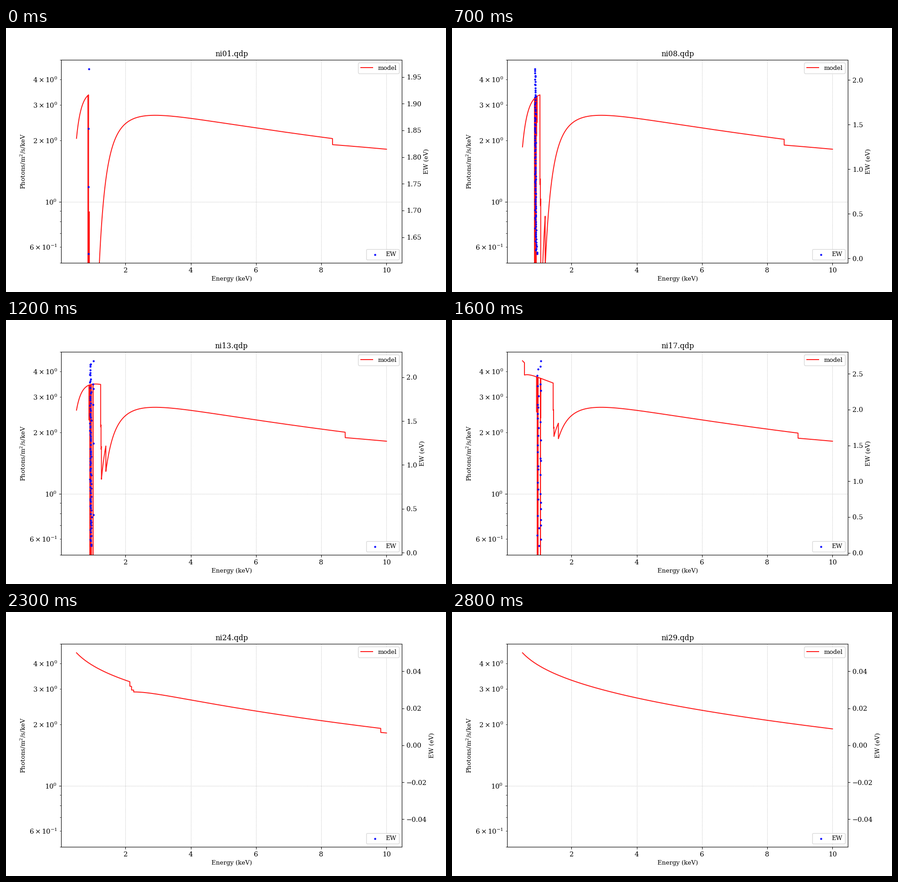
A matplotlib script for the animation above (2.9 s loop, 966 by 580 pixels).

```python
import numpy as np
import matplotlib.pyplot as plt
from matplotlib.animation import FuncAnimation

plt.rcParams.update({"font.family": "DejaVu Serif",
                     "mathtext.fontset": "dejavuserif"})

STAGES = 29
ENERGY = np.arange(0.5, 10.0002, 0.0005)


def base(x):
    """Log of the unabsorbed continuum."""
    return 1.476 - 0.15 * np.log(x) - 0.114 * x ** 0.63


def tail(x):
    """Optical depth of a full middle shell above its edges."""
    return 1.6 * x ** -2.5 + 3.6 * x ** -7


def rydberg(n):
    """Line energies of the one- and two-electron stages."""
    k = np.array([2, 3])
    return (10.29 + 0.49 * (n - 27)) * (1 - 1 / k ** 2)


def cluster(m):
    """Start of the main line group and place of the side group."""
    return 0.852 + 0.0004 * m ** 2, 0.88 + 0.0106 * m


def line_list(n):
    """Absorption lines as (energy, optical depth)."""
    if n in (27, 28):
        return [(e, 15) for e in rydberg(n)]
    if n > 18:
        return []
    start, side = cluster(n - 1)
    count = min(n + 1, 5, 20 - n)
    end = start + 0.011 * (count - 1)
    lines = [(e, 15) for e in np.linspace(start, end, count)]
    if 6 <= n <= 10:
        lines += [(end + 0.012, 0.45), (end + 0.027, 0.3)]
    if n > 10:
        lines += [(side, 15), (start - 0.022, 0.4)]
    if n > 14:
        lines.append((side + 0.011, 0.45))
    return lines


def spectrum(n):
    x = ENERGY
    m = n - 1                    # electrons removed
    late = max(m - 18, 0)        # of these from the middle shell
    shift = 0.0089 * min(m, 18) ** 1.5 + 0.117 * late
    edge = 0.87 + shift
    last_edge = edge + 0.16 - 0.006 * max(m - 16, 0)
    inner_edge = 8.345 + 1.05 * shift + 0.03 * late

    # outer shell
    left = max(18 - m, 0)
    amount = 0.93 * np.sin(np.pi * left / 27) ** 1.15
    outer = (x >= 0.5 + 0.06 * (n - 16)) & (x < edge)
    tau = outer * amount * (2 * x) ** -(2.65 - 0.003 * m ** 2)

    # middle shell, opening in steps
    gap = 0.012 + 0.008 * late
    low, mid = 0.2 + 0.01 * m, 0.15 + 0.028 * m
    share = np.select([x < edge, x >= last_edge, x < edge + gap, x < edge + 2 * gap],
                      [0, 1, low, mid], max(0.72, mid))
    tau += np.clip((27 - n) / 8, 0, 1) ** 0.8 * share * tail(x)

    # inner shell
    tau += (x >= inner_edge) * 0.069 * (x / 8.345) ** -2.5

    for e, depth in line_list(n):
        tau += depth * np.exp(-((x - e) / 0.0012) ** 2)
    return np.exp(base(x) - tau)


def widths(n):
    """Scatter points as (energy, equivalent width)."""
    if n in (27, 28):
        e = rydberg(n)
        return np.column_stack([e, [5.5, 2.5]])
    if n > 18:
        return np.empty((0, 2))
    m = n - 1
    rng = np.random.default_rng(40 + n)
    start, side = cluster(m)
    crowd = np.sin(np.pi * m / 18)
    count = int(4 + 95 * crowd)

    # heights from 0 to 1, gathered near the bottom in the early stages
    bend = 1 + 2.5 * np.exp(-((m - 3) / 2) ** 2)
    u = np.linspace(0, 1, count)
    u[1:-1] += rng.uniform(-0.5, 0.5, count - 2) / count
    h = u ** bend

    spread = 0.005 + 0.0005 * m
    e = start + 0.018 + spread * np.clip(rng.normal(size=count), -1.8, 1.8)
    e += 0.06 * rng.random(count) * (1 - h) ** 4 * crowd
    aside = rng.random(count) < 0.6 * (m / 17) ** 8
    e[aside] = side + 0.012 * rng.random(aside.sum())

    low = np.interp(m, [0, 1, 16], [1.619, 0.02, 0.1])
    high = np.interp(m, [0, 3, 7, 12, 16], [1.965, 1.884, 2.124, 2.187, 2.68])
    return np.column_stack([e, low + h * (high - low)])


fig, ax = plt.subplots(figsize=(10, 6.004141), dpi=96.6)
twin = ax.twinx()

model, = ax.plot([], [], color="red", lw=1.5, alpha=0.9, label="model")
dots = twin.scatter([], [], s=22, marker=".", color="blue", alpha=0.9, label="EW")

ax.set_yscale("log")
ax.set_xlim(0.025, 10.475)
ax.set_ylim(0.5, 5)
ax.grid(ls=":", lw=0.8)
ax.set_xlabel("Energy (keV)")
ax.set_ylabel("Photons/m$^2$/s/keV")
twin.set_ylabel("EW (eV)")
for a in (ax, twin):
    a.tick_params(which="both", labelsize=11)
ax.legend(loc="upper right")
twin.legend(loc="lower right")
title = ax.set_title("")


def update(i):
    n = i + 1
    title.set_text(f"ni{n:02d}.qdp")
    model.set_data(ENERGY, spectrum(n))
    points = widths(n)
    dots.set_offsets(points)
    if len(points):
        low, high = points[:, 1].min(), points[:, 1].max()
        margin = 0.05 * (high - low)
        twin.set_ylim(low - margin, high + margin)
    else:
        twin.set_ylim(-0.055, 0.055)
    return model, dots, title


anim = FuncAnimation(fig, update, frames=STAGES, interval=100,
                     repeat=True, repeat_delay=0, blit=False)
plt.show()
```
